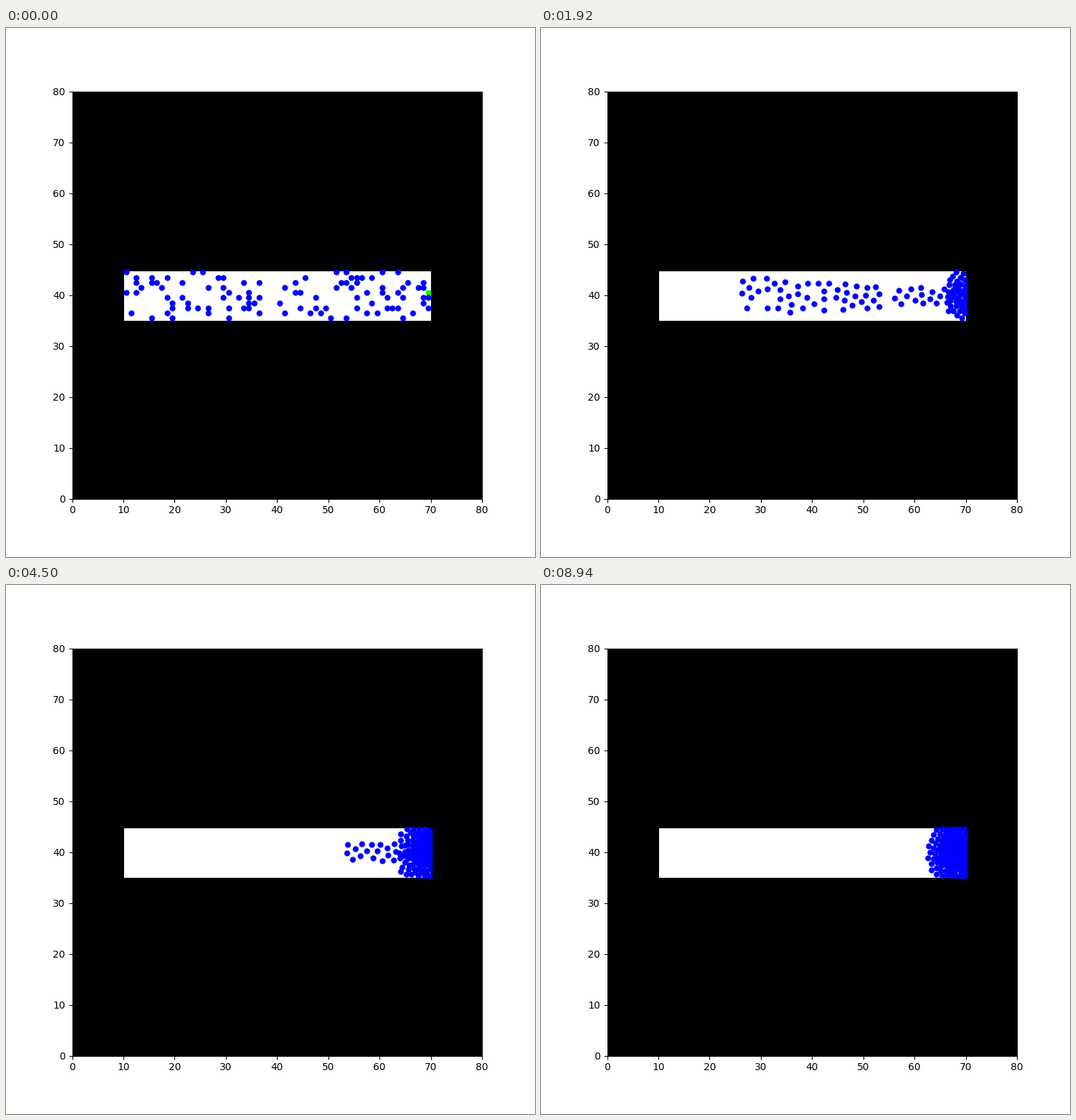
Write a matplotlib script that moves like this. It is 748 px wide and 748 px high and loops after 9000 ms.

```python
import numpy as np
import matplotlib.pyplot as plt
from matplotlib.animation import FuncAnimation
from matplotlib.patches import Rectangle

FRAMES, INTERVAL, SUBSTEPS = 150, 60, 6
SPEED, RELAX = 0.65, 8.0          # cells per frame, frames
LEFT, RIGHT, BOTTOM, TOP = 10, 70, 35, 45
EXIT = np.array([70.0, 40.0])

# Occupied columns in each corridor row, top row first
ROWS = [
    "10 23 25 51 53 60 63",
    "12 15 18 28 29 45 54 55 56 58",
    "12 15 16 21 33 36 43 52 53 55 65 68",
    "13 17 26 29 41 51 54 60 64 67 68",
    "10 12 30 34 43 44 57 60 63",
    "18 21 29 32 34 36 47 55 61 64 68 69",
    "19 22 34 35 40 58 68",
    "19 22 24 26 30 33 34 44 47 49 55 61 62 63 69",
    "11 18 26 36 41 46 48 57 59 66",
    "15 19 30 50 53 64",
]


def start_positions():
    return np.array([(int(col) + 0.5, TOP - 0.5 - row)
                     for row, cols in enumerate(ROWS)
                     for col in cols.split()])


def wall_push(dist):
    return 0.08 * np.exp((0.4 - dist) / 0.15)


def acceleration(pos, vel):
    to_exit = EXIT - pos
    to_exit /= np.linalg.norm(to_exit, axis=1, keepdims=True) + 1e-6
    acc = (SPEED * to_exit - vel) / RELAX

    gap = pos[:, None] - pos[None]
    dist = np.linalg.norm(gap, axis=2)
    np.fill_diagonal(dist, np.inf)
    force = 0.04 * np.exp((1.15 - dist) / 0.2)
    acc += (gap * (force / np.maximum(dist, 0.05))[..., None]).sum(axis=1)

    x, y = pos.T
    acc[:, 0] += wall_push(x - LEFT) - wall_push(RIGHT - x)
    acc[:, 1] += wall_push(y - BOTTOM) - wall_push(TOP - y)
    return acc


def simulate():
    pos = start_positions()
    vel = np.zeros_like(pos)
    low = np.array([LEFT + 0.4, BOTTOM + 0.4])
    high = np.array([RIGHT - 0.3, TOP - 0.4])
    dt = 1 / SUBSTEPS
    path = [pos.copy()]
    for _ in range(FRAMES - 1):
        for _ in range(SUBSTEPS):
            vel += acceleration(pos, vel) * dt
            moved = pos + vel * dt
            pos = np.clip(moved, low, high)
            vel[moved != pos] = 0
        path.append(pos.copy())
    return path


path = simulate()

fig, ax = plt.subplots(figsize=(7.48, 7.48), dpi=100)
fig.subplots_adjust(left=0.125, right=0.9, bottom=0.11, top=0.88)
ax.set_facecolor("black")
ax.set(xlim=(0, 80), ylim=(0, 80),
       xticks=range(0, 81, 10), yticks=range(0, 81, 10))
ax.add_patch(Rectangle((10.1, 35), 59.9, 9.75, color="white", lw=0))
ax.add_patch(Rectangle((69.05, 40), 0.95, 1, color="lime", lw=0))
dots, = ax.plot([], [], "o", color="blue", ms=5)


def draw(frame):
    dots.set_data(*path[frame].T)
    return dots,


anim = FuncAnimation(fig, draw, frames=FRAMES, interval=INTERVAL,
                     repeat=True, repeat_delay=0)
plt.show()
```
